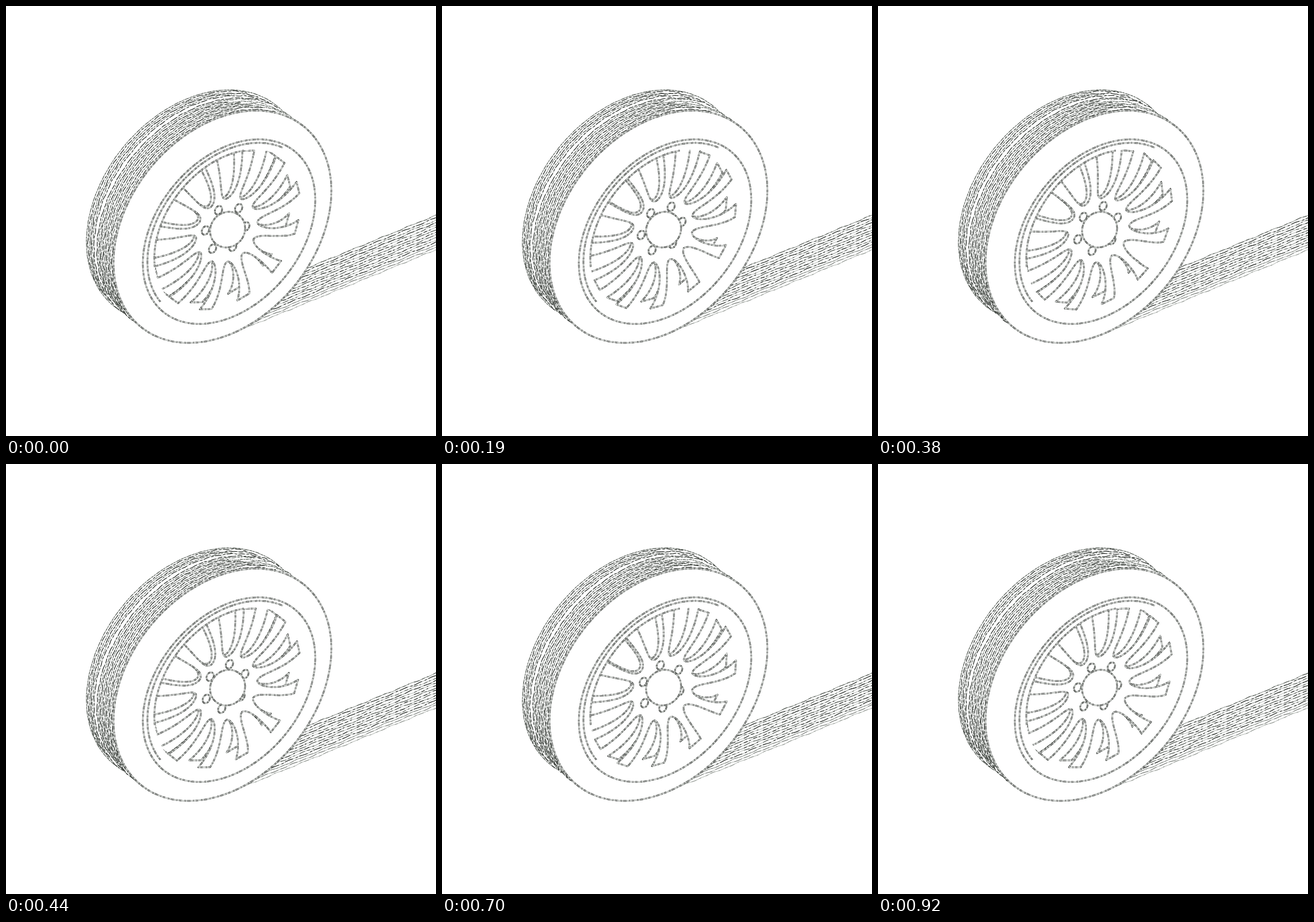
These frames come from a looping animation (748x748 px, 950 ms). An HTML page:

```html
<!DOCTYPE html>
<html lang="en">
<head>
<meta charset="utf-8">
<title>Rolling wheel</title>
<style>
html, body { margin: 0; width: 100%; height: 100%; overflow: hidden; background: #fff; }
svg { display: block; width: 100vw; height: 100vh; }
path { fill: none; stroke-linejoin: round; }
</style>
</head>
<body>
<svg id="stage" viewBox="0 0 748 748">
  <defs><clipPath id="well"><path id="wellPath"/></clipPath></defs>
</svg>
<script>
const NS = 'http://www.w3.org/2000/svg';
const stage = document.getElementById('stage');
const LOOP = 950, TICKS = 30, STEPS = 25;
const TURN = 60;     // degrees turned per loop
const TRAVEL = 216;  // track length covered per loop
const rad = Math.PI / 180;
const lerp = (a, b, f) => a + (b - a) * f;

// Ellipses: centre x, centre y, half width, half height, lean
const TYRE = [376.5, 384, 189.5, 202, -0.31];
const RIM = [388, 392.5, 150, 160.5, -0.345];
const LIP = [390, 392, 144, 154, -0.345];
const WELL = [388, 391, 130, 141, -0.34];
const HUB = [385.5, 389, 30.5, 31, -0.08];
const BOLTS = [382, 387, 35.6, 38.8, -0.255];
const SPOKE_IN = [384, 390, 53, 56, -0.22];
const SPOKE_OUT = [384.5, 389.5, 127, 138.5, -0.33];
const TREAD_DEPTH = [-47, -36];
const SPOKE_DEPTH = [-16, -12];
const DISH = [5, 4];  // how far the middle of a spoke bulges towards the viewer

// Point of a leaning ellipse: the unit circle through the root of its matrix
function at([cx, cy, w, h, lean], deg, r = 1) {
  const xx = w * w, yy = h * h, xy = lean * w * h;
  const root = Math.sqrt(xx * yy - xy * xy);
  const n = r / Math.sqrt(xx + yy + 2 * root);
  const c = Math.cos(deg * rad), s = Math.sin(deg * rad);
  return [cx + n * ((xx + root) * c + xy * s), cy + n * (xy * c + (yy + root) * s)];
}

const toPath = (pts, close) =>
  'M' + pts.map(p => p[0].toFixed(1) + ' ' + p[1].toFixed(1)).join('L') + (close ? 'Z' : '');

function arc(e, from = 0, to = 360) {
  const pts = [];
  for (let a = from; a <= to; a += 2) pts.push(at(e, a));
  return toPath(pts, to - from === 360);
}

function add(tag, attrs, parent = stage) {
  const el = document.createElementNS(NS, tag);
  for (const key in attrs) el.setAttribute(key, attrs[key]);
  parent.appendChild(el);
  return el;
}

// A contour made of two fine broken edges with white between
function contour(parent, fill = 'none') {
  const layers = [
    { stroke: '#8f958f', 'stroke-width': 2.5, style: 'fill:' + fill },
    { stroke: '#222622', 'stroke-width': 2.5, 'stroke-dasharray': '4 3 2 4 6 2 3 5' },
    { stroke: '#fff', 'stroke-width': 1 }
  ].map(l => add('path', l, parent));
  return d => layers.forEach(l => l.setAttribute('d', d));
}

// A tread line: grey base with dark dashes that travel along it
function treadLine(i, fill, extra) {
  const base = add('path', { stroke: i % 3 ? '#b3b8b3' : '#858b85', 'stroke-width': 1, style: 'fill:' + fill });
  const dark = add('path', { stroke: i % 2 ? '#222622' : '#5a605a', 'stroke-width': 1.15, ...extra });
  return (d, offset) => {
    base.setAttribute('d', d);
    dark.setAttribute('d', d);
    dark.setAttribute('stroke-dashoffset', offset);
  };
}

const trackDash = ['10 4 6 4 3 9', '15 5 4 3', '7 3 3 5', '12 6 14 4', '5 4 9 6 3 9'];
const track = Array.from({ length: 15 }, (_, i) =>
  treadLine(i, 'none', { 'stroke-dasharray': trackDash[i % 5], opacity: i > 11 ? 0.45 : 1 }));

// Tread rings from back to front with one groove; only some run all the way round
const ringDash = ['2 .8 1 .7 .6 .9', '3 1 1.2 .8', '1.4 .6 .5 .5', '4 1 2.2 .8 1.2 .8'];
const rings = [];
for (let i = 0; i < 18; i++) {
  if (i === 6) continue;
  const full = i % 6 === 0;
  const from = full ? 0 : 126 + i * 37 % 20;
  const to = full ? 360 : 304 - i * 53 % 37;
  const set = treadLine(i, '#fff', { 'stroke-dasharray': ringDash[i % 4], pathLength: to - from });
  rings.push({ i, from, to, set, depth: 1 - i / 18 });
}

contour(stage, '#fff')(arc(TYRE));
contour(stage, '#fff')(arc(RIM));
contour(stage)(arc(LIP, 137, 299));

document.getElementById('wellPath').setAttribute('d', arc(WELL));
const well = add('g', { 'clip-path': 'url(#well)' });
const gearBack = contour(well, '#fff');
const gearFront = contour(well, '#fff');
contour(stage)(arc(WELL, 163, 271));

const bolts = Array.from({ length: 6 }, () => contour(stage, '#fff'));
contour(stage, '#fff')(arc(HUB));

// Twelve spokes as one outline; v runs from an opening's tip (0) to the rim (1)
function gear(turn, depth) {
  const pts = [];
  for (let k = 0; k < 12; k++) {
    const mid = 22 + 30 * k - turn;
    for (let j = -12; j <= 12; j++) {
      const v = Math.abs(j) / 12;
      const half = 12 * (1 - (1 - v) ** 4) * (1 - 0.16 * v);
      const f = v ** 1.6;
      const e = SPOKE_IN.map((p, n) => lerp(p, SPOKE_OUT[n], f));
      const bulge = 4 * f * (1 - f), sink = depth * (0.25 + 0.75 * f);
      const p = at(e, mid + Math.sign(j) * half);
      pts.push(p.map((q, n) => q + DISH[n] * bulge + SPOKE_DEPTH[n] * sink));
    }
  }
  return toPath(pts, true);
}

function ringPath({ i, from, to, depth }, turn) {
  const e = [TYRE[0] + TREAD_DEPTH[0] * depth, TYRE[1] + TREAD_DEPTH[1] * depth, ...TYRE.slice(2)];
  const pts = [];
  for (let a = from; a <= to; a++) {
    const p = a + turn;
    const wave = Math.sin((36 * p + i * i * 70) * rad) + 0.6 * Math.sin((78 * p + i * i * 130) * rad);
    pts.push(at(e, a, 1 + (i ? 0.0027 : 0.0006) * wave));
  }
  return toPath(pts);
}

function trackPath(i, moved) {
  const f = i / 14, pts = [];
  for (let x = 415; x <= 750; x += 3) {
    const s = (x - 415) * 1.08 - moved;
    const wave = Math.sin(s * 2 * Math.PI / 54 + i * i * 1.3) + 0.7 * Math.sin(s * 2 * Math.PI / 24 + i * 2.1);
    pts.push([x, 364 + 60 * f + 0.41 * (748 - x) + 0.55 * wave]);
  }
  return toPath(pts);
}

function draw(step) {
  const turn = TURN * step / STEPS;
  const moved = TRAVEL * step / STEPS;
  track.forEach((set, i) => set(trackPath(i, moved), -moved));
  rings.forEach(r => r.set(ringPath(r, turn), turn));
  gearBack(gear(turn, 1));
  gearFront(gear(turn, 0));
  bolts.forEach((set, i) => {
    const [x, y] = at(BOLTS, 60 * i - 58 - turn);
    set(arc([x, y, 6.3, 7.5, -0.25]));
  });
}

// Thirty ticks per loop; every sixth one holds the previous pose
function stepAt(ms) {
  let k = TICKS - 1;
  while (k > 0 && Math.round(k * LOOP / TICKS / 10) * 10 > ms) k--;
  return k - Math.floor((k + 3) / 6);
}

const start = performance.now();
let shown = -1;
function frame() {
  const step = stepAt((performance.now() - start) % LOOP);
  if (step !== shown) draw(shown = step);
  requestAnimationFrame(frame);
}
frame();
</script>
</body>
</html>
```
